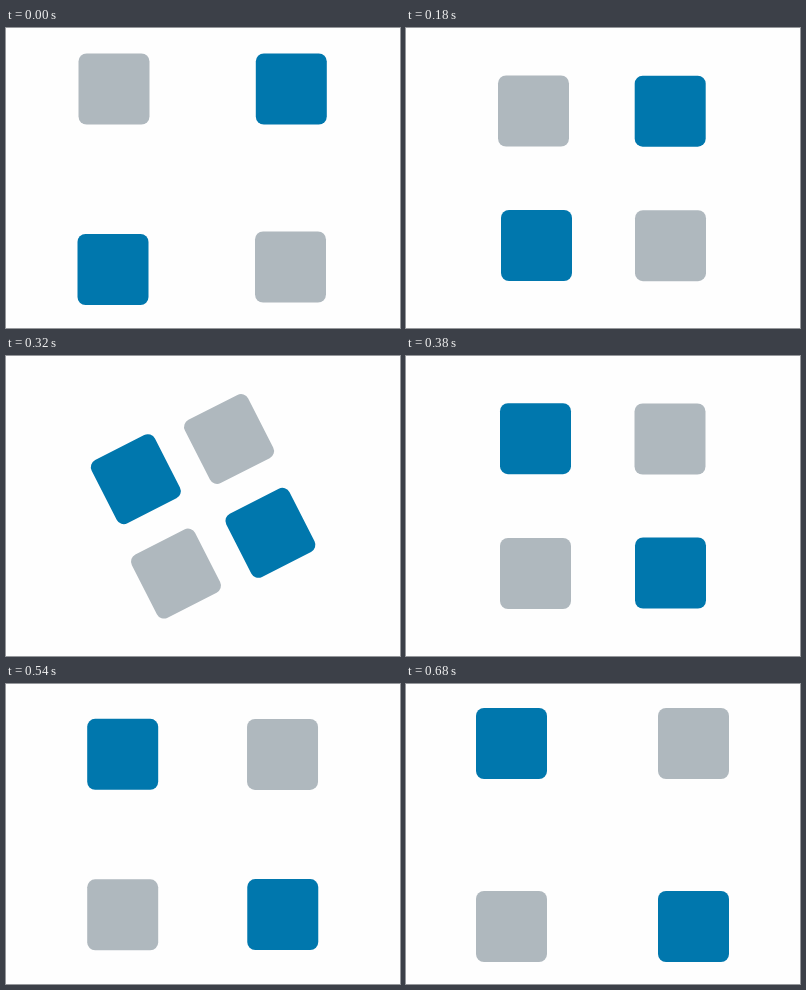
Animation of 394x300 px, one loop 0.98 s. Source, as an HTML page with a canvas:

```html
<!DOCTYPE html>
<html lang="en">
<head>
<meta charset="utf-8">
<title>Turning tiles</title>
<style>
  html, body { margin: 0; width: 100%; height: 100%; overflow: hidden; background: #fefefe; }
  canvas { display: block; }
</style>
</head>
<body>
<canvas id="stage" width="394" height="300"></canvas>
<script>
const ctx = document.getElementById('stage').getContext('2d');
const LOOP = 980, STEP = 20;
const TURN_START = 180, TURN_END = 380, SPREAD_END = 680;
const SIZE = 71, RADIUS = 8;
const GRAY = '#afb8be', BLUE = '#0077ad';

// Centres of each tile: at loop start, gathered, after the turn, spread out.
const tiles = [
  { color: GRAY, stops: [[108, 61], [127.5, 83], [264, 83], [287.5, 59.5]] },
  { color: BLUE, stops: [[285.3, 61], [264.2, 83.2], [264.5, 217], [287.5, 242.5]] },
  { color: GRAY, stops: [[284.5, 239], [264.5, 217.7], [129.5, 217.5], [105.5, 242.5]] },
  { color: BLUE, stops: [[107, 241.5], [130.5, 217.5], [129.5, 82.7], [105.5, 59.5]] }
];

const progress = (t, from, to) => Math.min(1, Math.max(0, (t - from) / (to - from)));
const mix = (a, b, p) => a + (b - a) * p;

function drawTile({ color, stops }, leg, p, angle) {
  const [from, to] = [stops[leg], stops[leg + 1]];
  ctx.save();
  ctx.translate(mix(from[0], to[0], p), mix(from[1], to[1], p));
  ctx.rotate(angle);
  ctx.fillStyle = color;
  ctx.beginPath();
  ctx.roundRect(-SIZE / 2, -SIZE / 2, SIZE, SIZE, RADIUS);
  ctx.fill();
  ctx.restore();
}

function draw(now) {
  const t = Math.floor((now % LOOP) / STEP) * STEP;
  const times = [0, TURN_START, TURN_END, SPREAD_END];
  const leg = t < TURN_START ? 0 : t < TURN_END ? 1 : 2;
  const p = progress(t, times[leg], times[leg + 1]);
  const angle = progress(t, TURN_START, TURN_END) * Math.PI / 2;

  ctx.fillStyle = '#fefefe';
  ctx.fillRect(0, 0, 394, 300);
  tiles.forEach(tile => drawTile(tile, leg, p, angle));
}

const start = performance.now();
function tick() {
  draw(performance.now() - start);
  requestAnimationFrame(tick);
}
tick();
</script>
</body>
</html>
```
